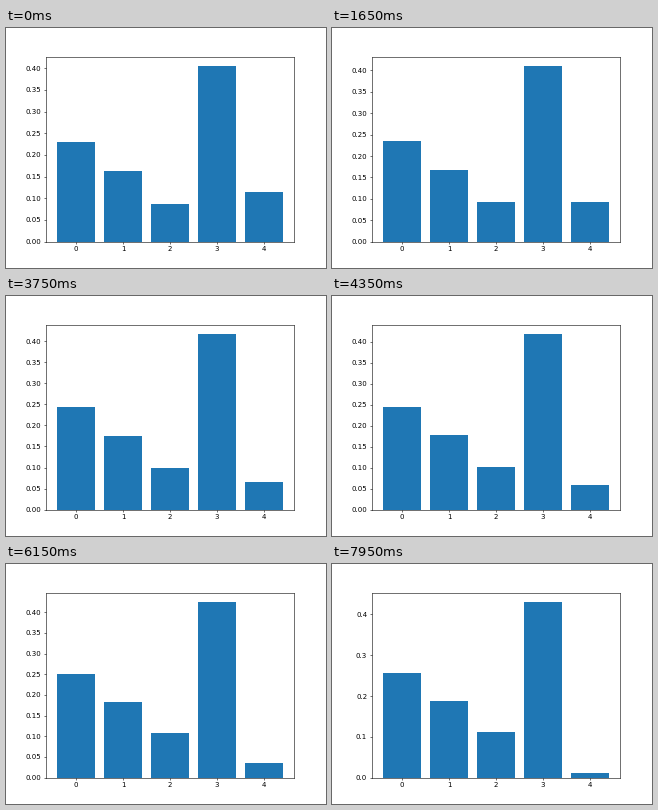
Write a matplotlib script that moves like this. It is 320x240 px and loops after 8000 ms.

```python
import numpy as np
import matplotlib.pyplot as plt
from matplotlib.animation import FuncAnimation

plt.rcParams["font.family"] = "DejaVu Sans"

INTERVAL = 50          # ms per frame
HOLD = 3               # frames per step of the data
FRAMES = 160
START = np.array([0.2305, 0.163, 0.087, 0.406, 0.1135])
LOSS = 0.00193         # the last bar's loss, shared equally by the others
STEP = np.array([LOSS / 4] * 4 + [-LOSS])

fig, ax = plt.subplots(figsize=(6.4, 4.8), dpi=50)
bars = ax.bar(range(len(START)), START)


def update(frame):
    values = START + STEP * (frame // HOLD)
    for bar, value in zip(bars, values):
        bar.set_height(value)
    ax.set_ylim(0, 1.05 * values.max())
    return bars


anim = FuncAnimation(fig, update, frames=FRAMES, interval=INTERVAL,
                     repeat=True, repeat_delay=0)
plt.show()
```
